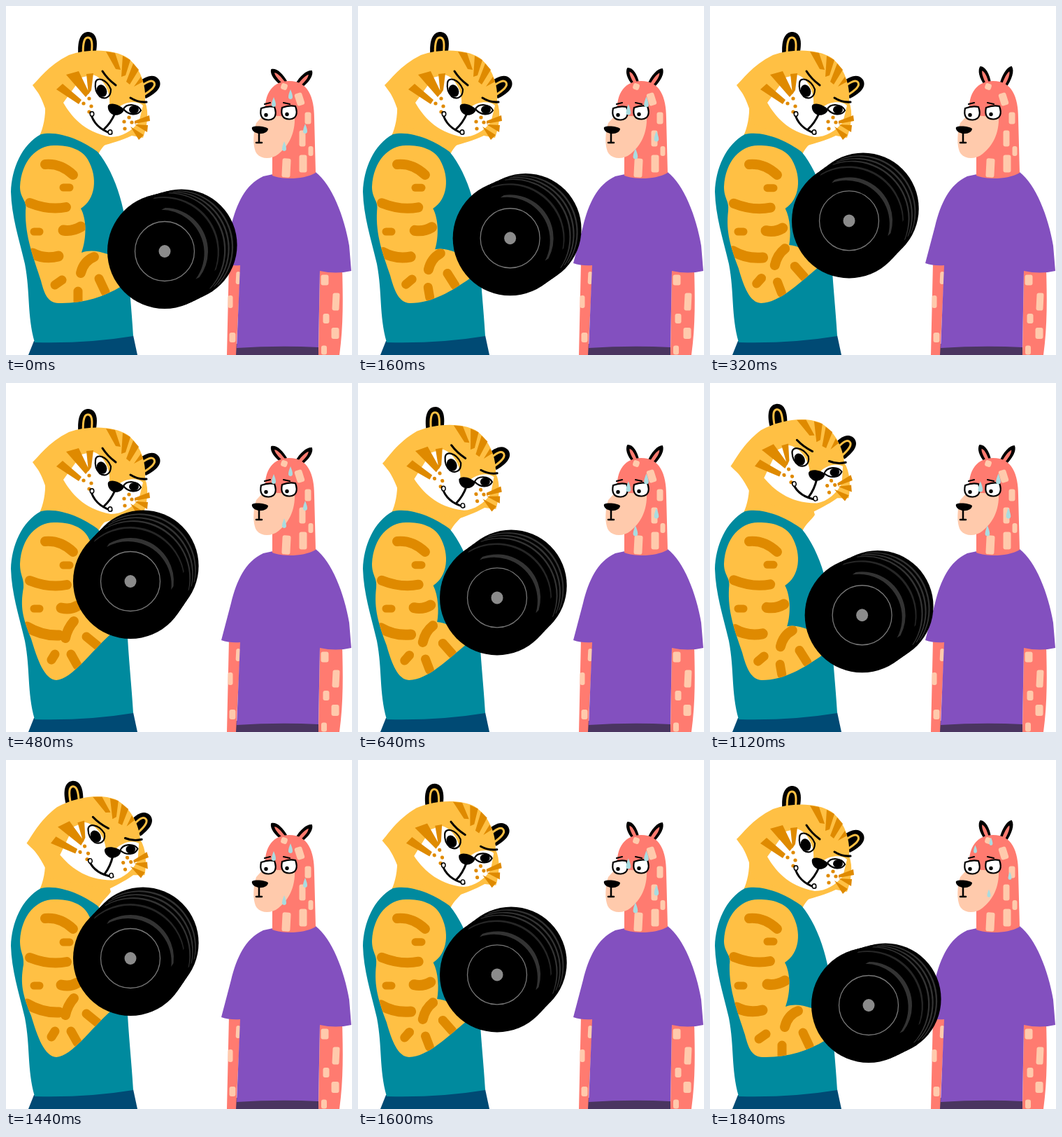
An HTML page with a canvas for the animation above (1.92 s loop, 495 by 498 pixels).

```html
<!DOCTYPE html>
<html>
<head>
<meta charset="utf-8">
<title>Curls</title>
<style>
html, body { margin: 0; width: 100%; height: 100%; overflow: hidden; background: #fff; }
canvas { display: block; }
</style>
</head>
<body>
<canvas id="stage" width="495" height="498"></canvas>
<script>
const c = document.getElementById('stage').getContext('2d');
const FUR = '#ffc044', STRIPE = '#df8a00', CORAL = '#ff7b70', PEACH = '#ffcaac', INK = '#000';
const TICK = 80, TICKS = 24;

const fill = (d, color) => { c.fillStyle = color; c.fill(new Path2D(d)); };
const line = (d, color, width) => {
  c.strokeStyle = color;
  c.lineWidth = width;
  c.stroke(new Path2D(d));
};
const oval = (x, y, rx, ry, color, turn = 0) => {
  c.beginPath();
  c.ellipse(x, y, rx, ry, turn, 0, 7);
  c.fillStyle = color;
  c.fill();
};
const ring = (x, y, r, from, to, color, width) => {
  c.beginPath();
  c.arc(x, y, r, from, to);
  c.strokeStyle = color;
  c.lineWidth = width;
  c.stroke();
};
// Sliver between two arcs, thickest in the middle
const crescent = (x, y, r, from, to, color, width) => {
  const mid = (from + to) / 2;
  c.beginPath();
  c.arc(x, y, r, from, to);
  c.arc(x - Math.cos(mid) * width, y - Math.sin(mid) * width, r, to, from, true);
  c.fillStyle = color;
  c.fill();
};
const lerp = (a, b, k) => a + (b - a) * k;
// Blend two paths that share the same commands
const mix = (a, b, k) => {
  const ends = b.match(/-?[\d.]+/g);
  let i = 0;
  return a.replace(/-?[\d.]+/g, v => lerp(+v, +ends[i++], k));
};
const placed = (x, y, turn, draw) => {
  c.save();
  c.translate(x, y);
  c.rotate(turn);
  draw();
  c.restore();
};

const armLow = 'M70 199C45 198 22 220 20 258C20 275 31 278 28 292C27 330 40 360 50 392C55 412 60 423 75 424C110 425 140 415 165 400L165 358C148 358 130 344 108 352C116 330 115 303 107 289C128 276 132 245 117 219C108 204 90 199 70 199Z';
const armHigh = 'M70 199C45 198 22 220 20 258C20 275 26 278 25 292C20 320 24 335 36 365C45 395 55 423 72 424C95 422 120 385 150 358L150 350C140 355 128 340 116 335C116 325 115 303 108 289C128 276 132 245 117 219C108 204 90 199 70 199Z';
// Low pose, high pose, width
const armStripes = [
  ['M56 226Q78 224 96 241', 'M56 226Q78 224 96 241', 14],
  ['M82 259L91 259', 'M82 260L91 260', 11],
  ['M34 281Q62 292 86 287', 'M34 282Q62 293 87 288', 14],
  ['M40 322L48 322', 'M40 322L48 322', 11],
  ['M82 320Q95 322 107 315', 'M79 321Q92 324 102 318', 15],
  ['M38 353Q55 362 75 357', 'M30 348Q52 361 76 360', 15],
  ['M107 381Q111 364 126 358', 'M85 364Q88 350 97 340', 14],
  ['M133 389L142 408', 'M115 362L131 375', 13],
  ['M70 398L80 391', 'M65 395L70 387', 13],
  ['M103 407L103 421', 'M93 387L102 403', 13]
];

function tigerBody() {
  fill('M40 478L32 498H188L182 470Z', '#004a74');
  fill('M56 140C57 158 53 175 48 185L132 212C137 200 146 195 150 188L130 120Z', FUR);
  fill('M50 183C22 198 8 233 7 265C8 300 18 330 27 368C35 410 30 440 41 480Q115 482 182 471C180 435 175 390 173 345C175 300 158 240 131 208C110 192 75 177 50 183Z', '#008a9e');
}

function tigerArm(k) {
  const arm = mix(armLow, armHigh, k);
  fill(arm, FUR);
  c.save();
  c.clip(new Path2D(arm));
  for (const [low, high, width] of armStripes) line(mix(low, high, k), STRIPE, width);
  c.restore();
}

function tigerEar(x, y, turn) {
  placed(x, y, turn, () => {
    fill('M-13 16C-15 -4 -10 -15 1 -15C12 -14 15 -2 12 16Z', INK);
    line('M-6 16C-7 0 -5 -7 0 -7C6 -7 7 2 6 16', FUR, 3);
  });
}

function tigerHead(turn) {
  c.save();
  c.translate(66, 163);
  c.rotate(turn * Math.PI / 180);
  c.translate(-66, -163);
  tigerEar(117, 52, 0.05);
  tigerEar(206, 113, 0.95);
  fill('M38 113C46 106 60 85 90 70C120 60 155 62 174 74C192 88 201 112 199 137C205 152 202 172 196 188L180 185C165 192 150 196 140 199L62 168C57 145 50 130 46 124Z', FUR);
  fill('M143 65L156 67L164 91L157 90ZM167 71L178 77L171 99L165 101ZM182 82L190 91L177 112L172 108ZM193 101L196 108L183 115Z', STRIPE);
  fill('M82 138C92 155 110 180 150 187C166 187 180 178 190 166L196 142C188 134 170 137 162 144L148 141C150 124 140 102 124 98L108 102Z', '#fff');
  fill('M86 98L104 93L119 124L114 130ZM72 119L81 111L108 134L104 140ZM115 97L125 96L122 120L118 126Z', STRIPE);
  fill('M184 164L205 156L206 164L184 168ZM184 169L203 170L202 180ZM178 172L197 184L190 191Z', STRIPE);
  for (const [x, y] of [[119, 132], [111, 139], [122, 143], [119, 151], [176, 159], [169, 165], [180, 166], [170, 175]])
    oval(x, y, 2.6, 2.6, STRIPE);

  line('M128 110C129 100 144 104 150 119C150 131 141 134 134 129C129 124 127 117 128 110Z', INK, 2.2);
  oval(137, 121, 7, 9, INK, -0.4);
  line('M168 147C173 138 189 140 193 149C188 157 175 156 168 147Z', INK, 2.2);
  oval(183, 148, 7, 6, INK);
  line('M138 93Q145 104 157 113M178 131Q189 138 201 137', INK, 3);
  fill('M146 142C150 136 165 142 169 148C167 155 157 158 151 154C147 151 145 146 146 142Z', INK);
  line('M156 153Q150 167 140 176M121 152Q126 174 151 182', INK, 3);
  for (const [x, y] of [[123, 154], [149, 180]]) {
    oval(x, y, 3.5, 4, INK);
    oval(x, y, 2, 2.6, '#fff');
  }
  c.restore();
}

function patch(x, y, w, h, turn = 0) {
  placed(x, y, turn, () => {
    c.beginPath();
    c.roundRect(-w / 2, -h / 2, w, h, 3);
    c.fillStyle = PEACH;
    c.fill();
  });
}

function llamaEar(x, y, tipX, tipY) {
  const length = Math.hypot(tipX - x, tipY - y);
  placed(x, y, Math.atan2(tipX - x, y - tipY), () => {
    c.scale(1, length / 20);
    fill('M-5 3C-8 -8 -6 -18 0 -21C7 -18 8 -8 5 3Z', INK);
    fill('M-2 3C-3 -7 -2 -12 0 -15C3 -12 3 -7 2 3Z', CORAL);
  });
}

function llamaEye(x, y) {
  placed(x, y, 0, () => {
    const shape = 'M-10 -7Q0 -11 9 -9C13 2 10 9 1 9.5C-10 10 -12 2 -10 -7Z';
    fill(shape, '#fff');
    line(shape, INK, 2.2);
    oval(-3, 2.5, 2.7, 2.7, INK);
  });
}

function sweat(phase) {
  const drop = [0, 6, 11, 14, null, -10][phase];
  if (drop === null) return;
  const size = [1, 1, 1.1, 0.7, 0, 0.8][phase];
  for (const [x, y] of [[383, 138], [407, 127], [428, 176], [398, 201]])
    placed(x + drop * (x < 390 ? 0.35 : x < 410 && y < 150 ? 0.5 : -0.1), y + drop, 0, () => {
      c.scale(size, size);
      fill('M0 -8C2 -3 3 0 3 3C3 7 -3 7 -3 3C-3 0 -2 -3 0 -8Z', '#a9dce0');
    });
}

function llama(phase) {
  const [lx, ly, rx, ry] = [[380, 91, 437, 93], [386, 89, 435, 90], [387, 87, 431, 87]][phase >> 1];
  fill('M329 482H447V498H329Z', '#4a3560');
  fill('M319 366L316 498H329L336 366ZM449 374L447 498H477C483 455 482 415 481 374Z', CORAL);
  patch(332, 388, 6, 18, 0.05);
  patch(321, 422, 7, 18);
  patch(324, 473, 9, 14);
  patch(456, 391, 11, 15);
  patch(472, 422, 10, 25, 0.05);
  patch(458, 446, 9, 14);
  patch(471, 467, 11, 16);
  patch(455, 491, 8, 13);

  fill('M368 243C342 255 330 282 322 314L308 367Q320 371 335 370L330 488Q390 484 447 487L449 378Q472 383 494 378L491 342C484 300 466 255 443 237C425 246 400 248 382 240Z', '#8350bf');
  llamaEar(396, 108, lx, ly);
  llamaEar(420, 112, rx, ry);
  fill('M371 156C368 122 384 107 405 107C432 107 441 130 441 160L443 238C425 248 397 248 381 242V215Z', CORAL);
  patch(420, 133, 11, 18, -0.3);
  patch(398, 115, 9, 9, 0.3);
  patch(432, 160, 9, 17);
  patch(424, 189, 9, 23);
  patch(436, 207, 7, 14);
  patch(401, 231, 12, 27, 0.05);
  patch(425, 225, 11, 25);
  fill('M358 167C353 182 353 203 359 211C366 219 380 219 390 211C404 200 414 182 413 158L368 156Z', PEACH);

  llamaEye(375, 153);
  llamaEye(405, 152);
  line('M370 140L378 138M397 138L406 140', INK, 2.2);
  fill('M352 173C358 170 371 172 375 175C375 181 365 184 358 181C354 180 351 176 352 173Z', INK);
  line('M362 181V195M358 195H366', INK, 2.5);
  sweat(phase);
}

function dumbbell(k) {
  const x = lerp(227, 178, k ** 1.3), y = lerp(350, 283, k);
  const dx = lerp(24, 18, k), dy = lerp(-9, -22, k), tilt = Math.atan2(dy, dx);
  for (let i = 4; i > 0; i--) {
    const px = x + dx * i / 4, py = y + dy * i / 4, r = 82 - i * 0.6;
    oval(px, py, r, r, INK);
    if (i < 4) crescent(px, py, r, tilt - 1.2, tilt + 1.1, '#333', 2.5);
  }
  oval(x, y, 82, 82, INK);
  crescent(x, y, 78, tilt - 1.4, tilt + 0.7, '#262626', 3);
  crescent(x, y, 62, tilt - 1.2, tilt + 1, '#333', 6);
  ring(x, y, 42.5, 0, 7, '#777', 1.3);
  oval(x, y, 8.5, 9, '#8b8b8b');
}

const lifts = [0, 0.28, 0.65, 1, 0.65, 0];
const headTurns = [0, 0, 0, 0, -3.5, -7.5, -10.3, -10.3, -10.3, -10.3, -4, 0];

function frame(now) {
  const tick = Math.floor(now / TICK) % TICKS, pose = tick >> 1;
  const lift = lifts[pose % 6];
  c.fillStyle = '#fff';
  c.fillRect(0, 0, 495, 498);
  c.lineCap = c.lineJoin = 'round';
  llama(tick % 6);
  tigerBody();
  tigerHead(headTurns[pose]);
  tigerArm(lift);
  dumbbell(lift);
}

const start = performance.now();
(function loop() {
  frame(performance.now() - start);
  requestAnimationFrame(loop);
})();
</script>
</body>
</html>
```
